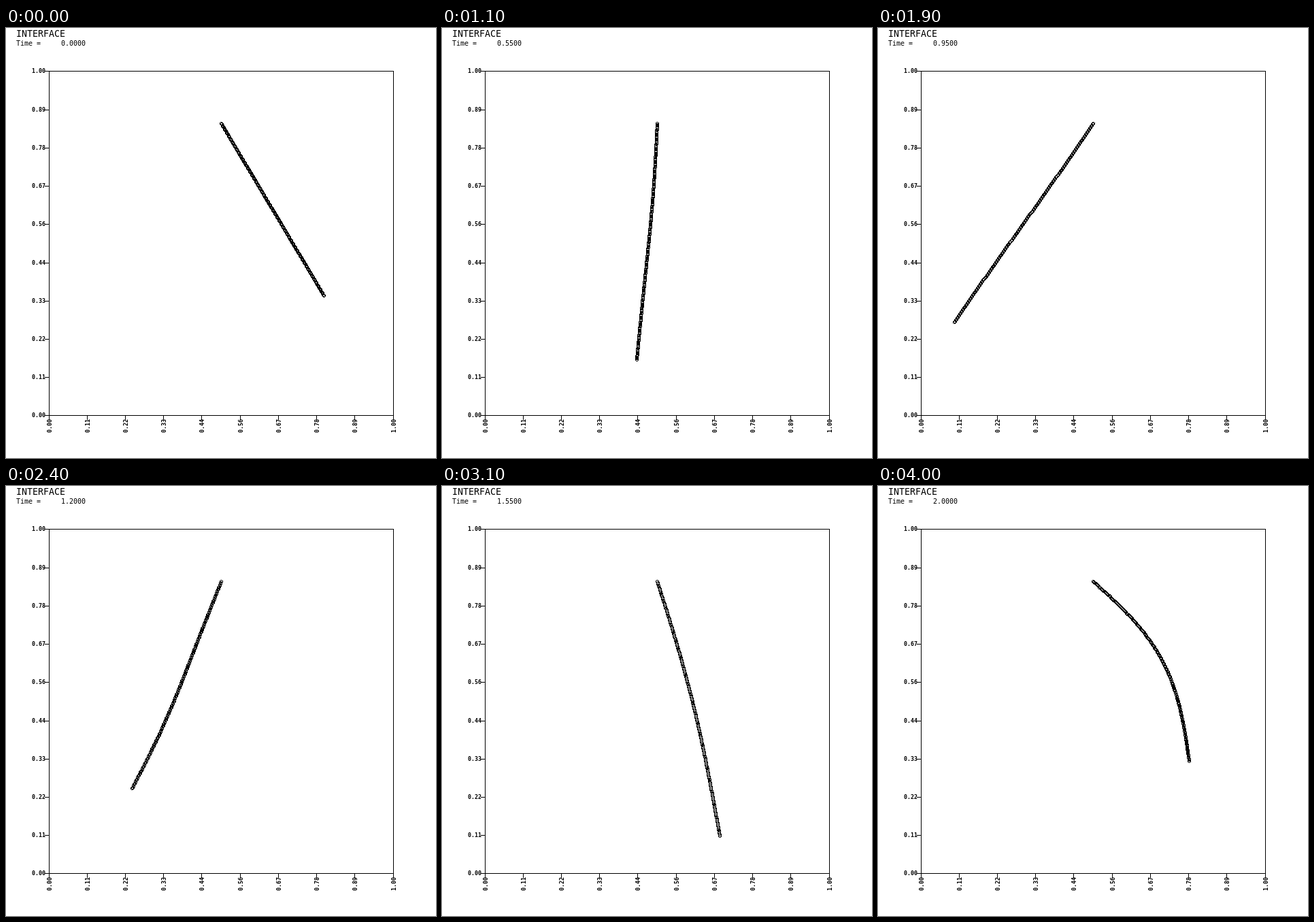
An HTML page with a canvas that plays this animation: 632 px wide and 632 px high, repeating every 4.1 s.

```html
<!DOCTYPE html>
<html lang="en">
<head>
<meta charset="utf-8">
<title>Interface</title>
<style>
  html, body { margin: 0; width: 100%; height: 100%; overflow: hidden; background: #fff; }
  canvas { display: block; }
</style>
</head>
<body>
<canvas id="stage" width="632" height="632"></canvas>
<script>
const ctx = document.getElementById('stage').getContext('2d');
const STEP = 100, LAST = 40, MARKERS = 200;
const LEFT = 63, TOP = 63, SIZE = 506, BOTTOM = TOP + SIZE;
const ANCHOR_X = 316, ANCHOR_Y = 140;

// Path of the free end: step, x, y
const tipPath = [
  [0, 467, 393], [6, 431, 505], [8, 384, 521], [11, 286, 487],
  [13, 218, 461], [19, 112, 432], [24, 185, 444], [30, 380, 513],
  [31, 408, 514], [36, 473, 422], [40, 457, 404]
];

// Cubic Hermite curve through the path, starting at rest
function tipAt(step, axis) {
  const end = tipPath.length - 1;
  const gap = i => tipPath[i + 1][0] - tipPath[i][0];
  const chord = i => (tipPath[i + 1][axis] - tipPath[i][axis]) / gap(i);
  const slope = i => {
    if (i === 0) return 0;
    if (i === end) return chord(end - 1);
    return (chord(i - 1) * gap(i) + chord(i) * gap(i - 1)) / (gap(i - 1) + gap(i));
  };
  let i = 0;
  while (i < end - 1 && step > tipPath[i + 1][0]) i++;
  const u = (step - tipPath[i][0]) / gap(i), v = 1 - u;
  return v * v * (1 + 2 * u) * tipPath[i][axis]
    + u * u * (1 + 2 * v) * tipPath[i + 1][axis]
    + gap(i) * u * v * (v * slope(i) - u * slope(i + 1));
}

// Small open circle on whole pixels
function marker(x, y) {
  ctx.fillRect(x - 1, y - 2, 3, 1);
  ctx.fillRect(x - 1, y + 2, 3, 1);
  ctx.fillRect(x - 2, y - 1, 1, 3);
  ctx.fillRect(x + 2, y - 1, 1, 3);
}

// Straight chord from anchor to tip, bent by a growing bow and a fading ripple
function drawFilament(step) {
  const dx = tipAt(step, 1) - ANCHOR_X, dy = tipAt(step, 2) - ANCHOR_Y;
  const length = Math.hypot(dx, dy), phase = 2 * Math.PI * step, progress = step / LAST;
  const bow = 36 * progress ** 5 - 3 * Math.sin(phase / 13);
  const ripple = -3.5 * (1 - progress) * Math.sin(phase / 20);
  for (let i = 0; i <= MARKERS; i++) {
    const s = i / MARKERS;
    const bend = (bow * Math.sin(Math.PI * s) + ripple * Math.sin(2 * Math.PI * s)) / length;
    marker(Math.round(ANCHOR_X + dx * s + dy * bend), Math.round(ANCHOR_Y + dy * s - dx * bend));
  }
}

function text(str, x, y, size, weight = 'normal') {
  ctx.font = `${weight} ${size}px "DejaVu Sans Mono", monospace`;
  ctx.fillText(str, x, y);
}

function drawAxes() {
  ctx.strokeRect(LEFT + 0.5, TOP + 0.5, SIZE, SIZE);
  for (let i = 0; i <= 9; i++) {
    const offset = Math.floor(SIZE * i / 9), label = (i / 9).toFixed(2);
    const x = LEFT + offset, y = BOTTOM - offset;
    ctx.fillRect(LEFT - 6, y, 6, 1);
    ctx.fillRect(x, BOTTOM, 1, 7);
    text(label, 38, y + 3, 8.3, 'bold');
    ctx.save();
    ctx.translate(x + 4, 595);
    ctx.rotate(-Math.PI / 2);
    text(label, 0, 0, 8.3, 'bold');
    ctx.restore();
  }
}

function draw(step) {
  ctx.clearRect(0, 0, 632, 632);
  text('INTERFACE', 15, 13, 13.3);
  text('Time =', 15, 26, 10);
  text((step * 0.05).toFixed(4), 81, 26, 10);
  drawAxes();
  drawFilament(step);
}

const start = performance.now();
function tick() {
  draw(Math.floor((performance.now() - start) / STEP) % (LAST + 1));
  requestAnimationFrame(tick);
}
tick();
</script>
</body>
</html>
```
